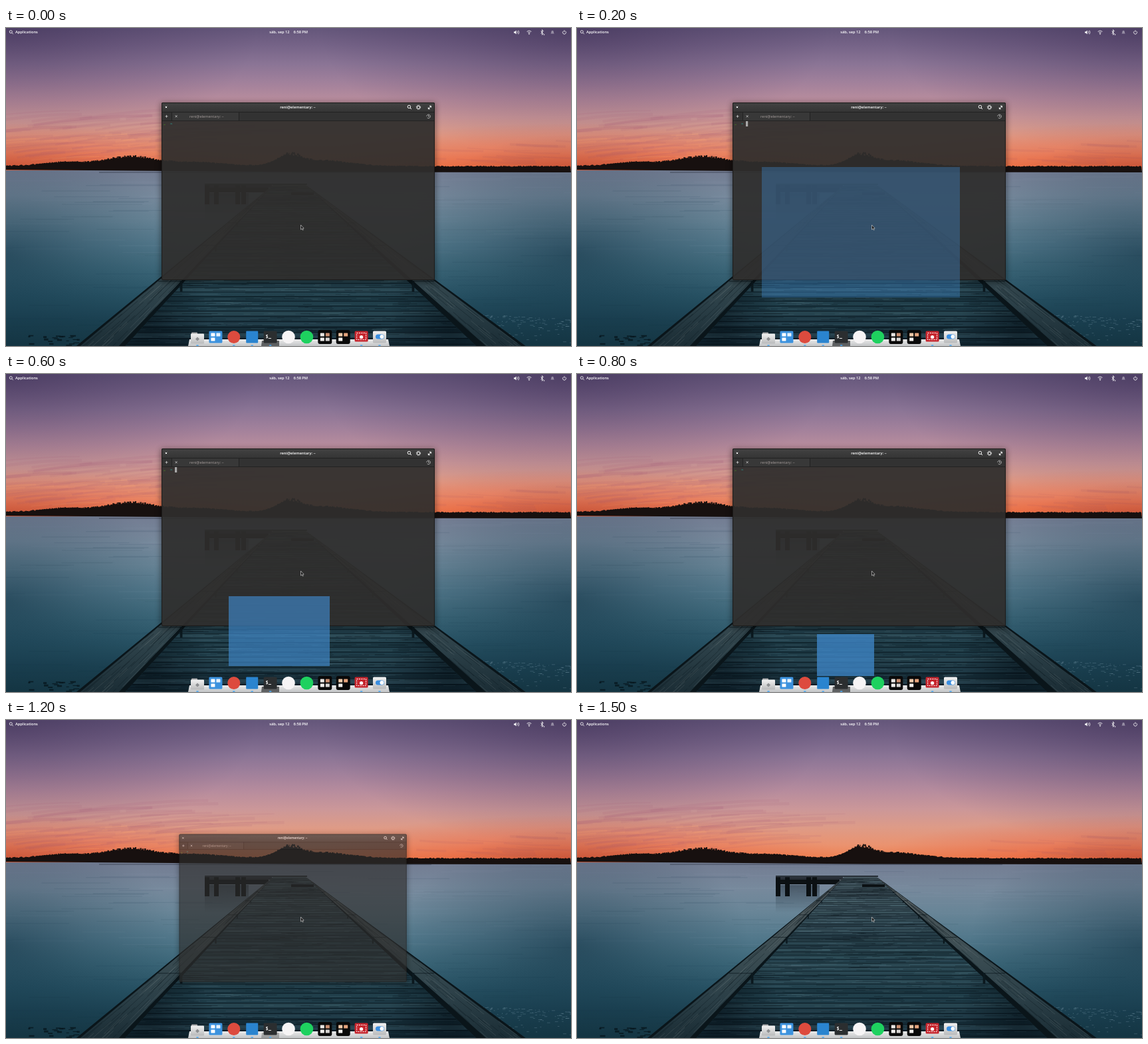
Recreate the animation shown at these times as an HTML page with a canvas. Size 850 by 478 pixels, loop 1.6 s.

```html
<!DOCTYPE html>
<html lang="en">
<head>
<meta charset="utf-8">
<title>Minimizing a window</title>
<style>
  html, body { margin: 0; width: 100%; height: 100%; overflow: hidden; background: #16303c; }
  canvas, svg { position: absolute; left: 0; top: 0; width: 850px; height: 478px; display: block; }
  text { font-family: "Open Sans", "Noto Sans", sans-serif; font-size: 5.7px; fill: #fff; }
  .bold { font-weight: 600; }
  .mono { font-family: "Noto Sans Mono", "DejaVu Sans Mono", monospace; font-weight: 700; }
  .line { fill: none; stroke: #fff; stroke-width: 1; }
  .thin { stroke-width: .8; }
</style>
</head>
<body>
<canvas id="wall" width="850" height="478"></canvas>
<svg viewBox="0 0 850 478">
  <defs>
    <filter id="blur" x="-10%" y="-10%" width="120%" height="120%"><feGaussianBlur stdDeviation="5"/></filter>
    <linearGradient id="head" x2="0" y2="1"><stop stop-color="#424242"/><stop offset="1" stop-color="#353535"/></linearGradient>
    <linearGradient id="shelf" x2="0" y2="1"><stop stop-color="#ececec"/><stop offset="1" stop-color="#c2c4c6"/></linearGradient>
    <linearGradient id="silver" x2="0" y2="1"><stop stop-color="#f2f2f2"/><stop offset="1" stop-color="#b9babb"/></linearGradient>
    <clipPath id="around"><path clip-rule="evenodd" d="M200 80H680V420H200ZM234 112V379H645V112Z"/></clipPath>
  </defs>

  <g id="bar">
    <circle class="line thin" cx="7.3" cy="5.7" r="2"/><path class="line thin" d="M8.8 7.2l2 2"/>
    <text class="bold" x="14" y="8.4">Applications</text>
    <text class="bold" x="396.3" y="8.4">sáb, sep 12</text>
    <text class="bold" x="432.6" y="8.4">6:58 PM</text>
    <path fill="#fff" d="M764 5.4h1.5l2-1.9v6l-2-1.9h-1.5z"/>
    <path class="line thin" d="M769 4.6q1.2 1.8 0 3.6M770.8 3.6q2 2.9 0 5.8"/>
    <path class="line thin" d="M783.6 5.4q3.4-3 6.8 0M785.2 7q1.8-1.5 3.6 0"/><circle cx="787" cy="8.7" r=".9" fill="#fff"/>
    <path class="line thin" d="M804.5 4.5l4 4-2 1.8v-7.6l2 1.8-4 3.8"/><circle cx="809.5" cy="10" r=".8" fill="#fff"/>
    <path d="M819.4 8.5q1-1 1-3 0-1.8 1.7-1.8t1.7 1.8q0 2 1 3z" fill="#fff" opacity=".4"/>
    <path class="line thin" d="M838.5 4.7a2.5 2.5 0 1 0 3 0M840 3.2v3"/>
  </g>

  <g id="dock">
    <path fill="url(#shelf)" d="M276 468H575L577 478H274Z"/>
    <path id="active" fill="#4a4c4e" d="M385 470H411V478H384Z"/>
    <g id="icons"></g>
  </g>

  <g id="win">
    <rect x="233" y="113" width="413" height="269" opacity=".45" filter="url(#blur)" clip-path="url(#around)"/>
    <rect x="234" y="112" width="411" height="267" rx="1.5" fill="#2f2e2d" fill-opacity=".93"/>
    <path fill="url(#head)" d="M234 126V113.5q0-1.5 1.5-1.5H643.5q1.5 0 1.5 1.5V126Z"/>
    <path fill="#323232" d="M234 126H645V139H234Z"/>
    <path fill="#383838" d="M249 126H350V139H249Z"/>
    <path stroke="#222" fill="none" d="M234 126.5H645M234 139.5H645M249.5 126V139M350.5 126V139"/>
    <rect x="234.5" y="112.5" width="410" height="266" rx="1.5" fill="none" stroke="#1c1b1a"/>
    <path class="line" d="M239.7 117.7l2.4 2.4m0-2.4l-2.4 2.4"/>
    <text class="bold" x="439" y="121" text-anchor="middle">reni@elementary: ~</text>
    <circle class="line" cx="606.4" cy="118.4" r="2.2"/><path class="line" d="M608 120l2 2"/>
    <circle class="line" cx="620.5" cy="119.2" r="2.1" stroke-width="1.6"/>
    <circle class="line" cx="620.5" cy="119.2" r="3.2" stroke-dasharray="1.2 1.31"/>
    <path class="line" d="M635.6 121.4l3.6-3.8M637 117.2h2.4v2.4M635.3 119.4v2.3h2.4"/>
    <path class="line thin" d="M239.5 132.8h4M241.5 130.8v4M254.6 131.2l3 3m0-3l-3 3" opacity=".75"/>
    <text x="276" y="135" style="fill:#a39b99">reni@elementary: ~</text>
    <path class="line thin" d="M632.8 132.8a2.8 2.8 0 1 1 .8 2M635.6 131v2h1.6" opacity=".7"/>
    <text class="mono" x="236.5" y="146.4" style="fill:#52c41a">→</text>
    <text class="mono" x="247" y="146.4" style="fill:#28b5ae">~</text>
    <rect id="caret" x="254" y="140" width="3.2" height="8" fill="#a9a9a9"/>
  </g>

  <rect id="ghost" fill="#3f86c8"/>
  <path fill="#1a1a1a" stroke="#ddd" stroke-width=".6" d="M443.5 296v7l1.6-1.4 1.2 2.3 1-.5-1.1-2.3h2z"/>
</svg>

<script>
const $ = id => document.getElementById(id);
const W = 850, H = 478, LOOP = 1600, STEP = 100;
const lerp = (a, b, k) => a + (b - a) * k;
const clamp = v => Math.min(1, Math.max(0, v));

let seed = 11;
const rnd = (a = 0, b = 1) => {
  seed = (seed * 16807) % 2147483647;
  return a + (b - a) * seed / 2147483647;
};

// ---------- wallpaper ----------
const c = $('wall').getContext('2d');

// evenly spaced colour stops
function blend(g, ...colors) {
  colors.forEach((color, i) => g.addColorStop(i / (colors.length - 1), color));
  return g;
}
const down = (y0, y1, ...colors) => blend(c.createLinearGradient(0, y0, 0, y1), ...colors);

function box(fill, x, y, w, h) {
  c.fillStyle = fill;
  c.fillRect(x, y, w, h);
}

function glow(color, x, y, rx, ry) {
  c.save();
  c.translate(x, y);
  c.scale(1, ry / rx);
  box(blend(c.createRadialGradient(0, 0, 0, 0, 0, rx), color(1), color(.45), color(0)), -rx, -rx, 2 * rx, 2 * rx);
  c.restore();
}
const tint = (rgb, strength) => k => `rgba(${rgb},${strength * k})`;

function streaks(n, color, x0, x1, y0, y1, len, width, rise = 0) {
  c.strokeStyle = color;
  for (let i = 0; i < n; i++) {
    const x = rnd(x0, x1), y = rnd(y0, y1), l = rnd(.3, 1) * len;
    c.lineWidth = rnd(.3, 1) * width;
    c.beginPath();
    c.moveTo(x, y);
    c.quadraticCurveTo(x + l / 2, y - rise * l, x + l, y - rise * l);
    c.stroke();
  }
}

function sky() {
  box(down(0, 214, '#64567a', '#766488', '#8a7495', '#a0809b', '#b78c9d', '#cb9799', '#dd9b88', '#ea9370', '#ef7c48'), 0, 0, W, 216);
  [0, W].forEach(x => {
    glow(tint('225,65,40', .55), x, 208, 400, 65);
    glow(tint('40,25,65', .4), x, 0, 380, 190);
  });
  streaks(60, 'rgba(150,85,110,.09)', -80, 230, 135, 200, 200, 5, .08);
  streaks(12, 'rgba(255,165,110,.14)', -40, 230, 165, 200, 130, 3, .06);
  streaks(14, 'rgba(160,80,95,.1)', 600, 840, 165, 200, 130, 4, -.04);
}

function water() {
  box(down(214, H, '#737c92', '#77899c', '#688597', '#52788b', '#3c6779', '#295466', '#1c4252', '#153643'), 0, 214, W, 264);
  streaks(90, 'rgba(170,185,200,.06)', -50, W, 218, 340, 150, 1.6);
  streaks(90, 'rgba(10,45,62,.08)', -50, W, 218, 470, 150, 1.6);
  [0, W].forEach(x => glow(tint('10,40,58', .5), x, 340, 260, 180));
  for (let i = 0; i < 110; i++) {
    const x = rnd(715, 850);
    box('rgba(150,180,195,.3)', x, 430 + rnd() * rnd() * 45 + (x - 715) * .06, rnd(1, 6), .8);
  }
  for (let i = 0; i < 22; i++) box('rgba(6,20,27,.75)', rnd(25, 108), rnd(461, 477), rnd(3, 9), rnd(1, 3));
}

function shore() {
  const hill = (x, mid, width, height) => height * Math.exp(-(((x - mid) / width) ** 2));
  const top = x => 207 + x * .001 - hill(x, 85, 45, 5) - hill(x, 187, 55, 13) - hill(x, 290, 55, 5)
    - hill(x, 425, 24, 12) - hill(x, 470, 65, 8);
  c.fillStyle = '#17100f';
  c.beginPath();
  c.moveTo(0, 213);
  for (let x = 0; x <= W; x += 1.5) c.lineTo(x, top(x) + rnd(-.8, .8));
  c.lineTo(W, 217);
  c.lineTo(440, 216.5);
  c.closePath();
  c.fill();
  // ragged crowns
  for (let x = 0; x < W; x += 2) {
    const tall = 207 - top(x);
    if (tall > 2) box('#17100f', x + rnd(-1, 1), top(x) - rnd() * tall * .25, rnd(1, 3), 3);
  }
  box('rgba(35,40,55,.3)', 140, 216, 500, 2);
}

// Every long edge is a straight line from the far end: x = x0 + slope * (y - FAR)
const FAR = 236;
const rails = [
  { x0: 402, outer: -1.2, inner: -.96, face: -.92 },
  { x0: 451, outer: 1.34, inner: 1.12, face: 1.06 }
];
const at = (x0, slope, y) => x0 + slope * (y - FAR);

function wedge(fill, xa, a, xb, b) {
  c.beginPath();
  c.moveTo(xa, FAR);
  c.lineTo(xb, FAR);
  c.lineTo(at(xb, b, H), H);
  c.lineTo(at(xa, a, H), H);
  c.fillStyle = fill;
  c.fill();
}

function jetty() {
  box(down(248, 290, 'rgba(12,26,36,.45)', 'rgba(12,26,36,0)'), 299, 248, 66, 42);
  box('#141a1e', 299, 234, 154, 1.6);
  box('rgba(20,26,30,.8)', 303, 236, 97, 4);
  box('#0c1114', 299, 240, 96, 7);
  for (const x of [299, 313, 345, 354]) box('#0b1013', x, FAR, 7, 29);
}

function deck() {
  const [l, r] = rails;
  c.save();
  wedge(down(FAR, H, '#42525a', '#334a54', '#274550', '#1d3a46', '#142b36'), l.x0, l.face, r.x0, r.face);
  c.clip();
  for (let y = 238, gap = 2.1; y < H; y += gap, gap *= 1.03) {
    const tone = rnd(-1, 1);
    box(tone > 0 ? `rgba(95,130,142,${tone * .2})` : `rgba(0,12,20,${-tone * .25})`, 160, y, 560, gap);
    box('rgba(3,14,20,.7)', 160, y, 560, Math.max(.6, gap * .15));
    for (let i = 0; i < 24; i++)
      box(i % 2 ? 'rgba(115,150,160,.2)' : 'rgba(0,10,16,.4)', rnd(170, 690), y + rnd(.2, .8) * gap, rnd(8, 50), .7);
  }
  rails.forEach(s => glow(tint('0,8,14', .5), at(s.x0, s.face, 440), 440, 90, 120));
  c.restore();
}

function rail({ x0, outer, inner, face }) {
  wedge('#0a151a', x0, outer * 1.02, x0, face);
  wedge(down(FAR, H, '#4a5053', '#465256', '#3a4c52', '#2b3f47', '#1b2d35'), x0, outer, x0, inner);
  // grain along the beam
  for (let i = 0; i < 70; i++) {
    const slope = lerp(outer, inner, rnd()), y = rnd(240, H), end = y + rnd(8, 35);
    c.strokeStyle = i % 3 ? 'rgba(4,16,22,.4)' : 'rgba(135,145,145,.25)';
    c.lineWidth = .8;
    c.beginPath();
    c.moveTo(at(x0, slope, y), y);
    c.lineTo(at(x0, slope, end), end);
    c.stroke();
  }
  // joints and the posts below them, spaced by perspective
  for (let d = 22; d < 200; d *= 1.6) {
    const y = FAR + d, a = at(x0, outer, y), b = at(x0, inner, y);
    box('rgba(5,16,22,.6)', Math.min(a, b), y, Math.abs(a - b), 1);
    box('#0b181e', b - d / 80, y, d / 40, d / 9);
  }
}

function pier() {
  jetty();
  deck();
  rails.forEach(rail);
  box('#0c1114', 429, 247, 34, 4);
}

[sky, water, shore, pier].forEach(draw => draw());

// ---------- dock ----------
const rect = (x, y, w, h, fill, r = 0) => `<rect x="${x}" y="${y}" width="${w}" height="${h}" rx="${r}" fill="${fill}"/>`;
const plate = (fill, h = 18) => rect(-10, -9, 20, h, fill, 1.5);
const disc = (r, fill) => `<circle r="${r}" fill="${fill}"/>`;
// up to four tiles in a two by two grid
const grid = (...fills) => fills.map((fill, i) => rect(i % 2 ? 1 : -7, i < 2 ? -6 : 1, 6, 5, fill, .5)).join('');
const black = rect(-10.5, -10.5, 21, 21, '#090909', 3);

const icons = [
  rect(-9, -7, 9, 5, '#a9aaab', 1) + rect(-10, -5, 20, 15, 'url(#silver)', 1) + '<path fill="#8d8f91" d="M0 0l3 3-3 3-3-3z"/>',
  plate('#3c92de') + grid('#fff', '#e6f2fd', '#fff'),
  disc(9.5, '#dd4b3e'),
  rect(-9, -9, 18, 18, '#2a84cf', 1),
  plate('#2b2e30') + '<text class="mono" x="-7" y="1" style="font-size:7px">$_</text>',
  disc(9.8, '#f6f4f5'),
  disc(9.8, '#1ed15f'),
  black + grid('#e9e6e3', '#c98e70', '#f1efed', '#d7d5d3'),
  black + grid('#efc9a8', '#e6a47d', '#f3efec'),
  plate('#c6262e', 16) + '<rect x="-7" y="-6" width="14" height="10" class="line" stroke-dasharray="2 1.4"/>' + disc(2.6, '#fff'),
  plate('url(#silver)') + rect(-6, -4, 13, 7, '#3a8ee0', 3.5) + '<circle cx="3.5" cy="-.5" r="3" fill="#fff"/>'
];
const running = [0, 2, 3, 4, 9, 10];
$('icons').innerHTML = icons.map((art, i) => {
  const dot = running.includes(i) ? '<ellipse cy="12.6" rx="2" ry=".9" fill="#4aa6ee"/>' : '';
  return `<g transform="translate(${288 + i * 27.4} 464.5)">${art}${dot}</g>`;
}).join('');

// ---------- motion ----------
const open = { x: 234, y: 112, r: 645, b: 379 };
const slot = { x: 380, y: 432, r: 417, b: 465 };

function set(id, attrs) {
  for (const k in attrs) $(id).setAttribute(k, attrs[k]);
}
const show = on => on ? 'visible' : 'hidden';

function moveGhost(t) {
  const s = t / 1000;
  const u = .245 + .59 * s + .09 * s * s;
  const p = u * u * (3 - 2 * u);
  const mix = side => lerp(open[side], slot[side], p);
  const x = Math.round(mix('x')), y = Math.round(mix('y'));
  set('ghost', {
    x, y,
    width: Math.round(mix('r')) - x,
    height: Math.round(mix('b')) - y,
    opacity: .85 * p ** .65,
    visibility: show(t >= 100 && t <= 1000)
  });
}

function moveWindow(t) {
  const u = clamp((t - 1000) / 350);
  const p = u ** 3.1;
  const x = lerp(439.5, 395, p), y = lerp(245.5, 457, p);
  set('win', {
    transform: `translate(${x} ${y}) scale(${1 - .95 * p}) translate(-439.5 -245.5)`,
    opacity: 1 - u ** 2.25
  });
  set('active', { opacity: .85 * (1 - u) });
  set('caret', { visibility: show(t >= 100 && t < 800) });
}

function frame(now) {
  const t = Math.floor(now % LOOP / STEP) * STEP;
  moveGhost(t);
  moveWindow(t);
  requestAnimationFrame(frame);
}
frame(performance.now());
</script>
</body>
</html>
```
